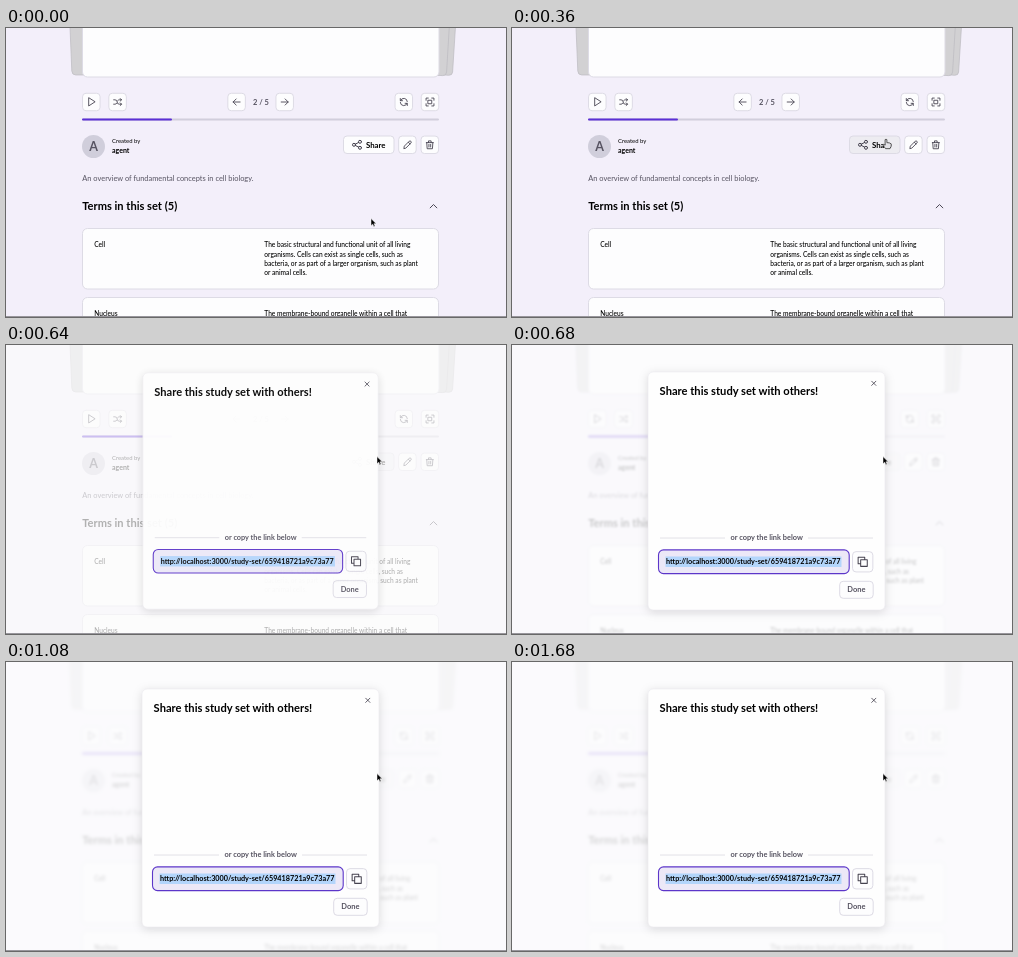
Animation, 500 px wide and 289 px high, one loop 1720 ms. Source, as an HTML page:

```html
<!DOCTYPE html>
<html lang="en">
<head>
<meta charset="utf-8">
<title>Share study set</title>
<style>
html, body { margin: 0; width: 100%; height: 100%; overflow: hidden; background: #f3effa; }
svg { display: block; width: 100vw; height: 100vh; font-family: Lato, sans-serif; }
.box { fill: #fdfdfe; stroke: #dddbe5; }
.icon { fill: none; stroke: #45424f; stroke-width: 2; stroke-linecap: round; stroke-linejoin: round; }
.rule { stroke: #e2e1e7; }
.stack { fill: #d2d1d3; stroke: #bcbbc0; stroke-width: .7; }
.bold { font-weight: 700; }
.body { font-size: 6.62px; font-weight: 500; }
.soft { fill: #565361; }
#dialog { transform-origin: 254.5px 150px; }
#panel { filter: drop-shadow(0 2px 5px #0002); }
</style>
</head>
<body>
<svg id="stage" viewBox="0 0 500 289" preserveAspectRatio="none"></svg>
<script>
const icons = {
  play: 'M6 3v18l14-9z',
  shuffle: 'M18 4l3 3-3 3M18 20l3-3-3-3M3 7h3a5 5 0 0 1 5 5 5 5 0 0 0 5 5h5M21 7h-5a5 5 0 0 0-4 2M3 17h3a5 5 0 0 0 4-2',
  prev: 'M20 12H4M11 5l-7 7 7 7',
  next: 'M4 12h16M13 5l7 7-7 7',
  refresh: 'M20 11A8 8 0 0 0 4.5 9M4 4v5h5M4 13a8 8 0 0 0 15.5 2M20 20v-5h-5',
  expand: 'M3 8V3h5M16 3h5v5M21 16v5h-5M8 21H3v-5M8 8h8v8H8z',
  share: 'M9 12a3 3 0 1 1-6 0 3 3 0 0 1 6 0M21 6a3 3 0 1 1-6 0 3 3 0 0 1 6 0M21 18a3 3 0 1 1-6 0 3 3 0 0 1 6 0M8.7 10.7l6.6-3.4M8.7 13.3l6.6 3.4',
  edit: 'M4 20l1-5L16 4a2.8 2.8 0 0 1 4 4L9 19zM14 6l4 4',
  trash: 'M4 7h16M10 11v6M14 11v6M5 7l1 14h12l1-14M9 7V3h6v4',
  copy: 'M8 8h13v13H8zM16 8V3H3v13h5',
  up: 'M5 15.500l7-7 7 7',
  close: 'M7 7l10 10M17 7L7 17'
};

const icon = (name, cx, cy, size = 10.5) =>
  `<path class="icon" d="${icons[name]}" transform="translate(${cx - size / 2} ${cy - size / 2}) scale(${size / 24})"/>`;
const box = (x, y, w, h, r = 3.5, extra = '') =>
  `<rect class="box" x="${x}" y="${y}" width="${w}" height="${h}" rx="${r}" ${extra}/>`;
const button = (name, cx, cy, size = 17.5) =>
  box(cx - size / 2, cy - size / 2, size, size) + icon(name, cx, cy, size * .6);
const text = (str, x, y, size, cls = '', extra = '') =>
  `<text x="${x}" y="${y}" class="${cls}" ${size ? `font-size="${size}"` : ''} ${extra}>${str}</text>`;
const middle = 'text-anchor="middle"';

const definition = [
  'The basic structural and functional unit of all living',
  'organisms. Cells can exist as single cells, such as',
  'bacteria, or as part of a larger organism, such as plant',
  'or animal cells.'
];

const page = `
  <path class="stack" d="M451.3-30L446.6 44q-.3 3.5-4 3.3L400 44V-30z"/>
  <path class="stack" d="M445-30L440.6 44q-.3 3.8-4 3.6L400 46V-30z"/>
  <path class="stack" d="M62.8-30L65.8 43q.2 4 4 4L100 47V-30z"/>
  ${box(76.5, -30, 356.5, 79, 5)}
  ${button('play', 85.3, 74)}${button('shuffle', 111.6, 74)}
  ${button('prev', 230.6, 74)}${button('next', 278.7, 74)}
  ${button('refresh', 397.8, 74)}${button('expand', 424, 74)}
  ${text('2 / 5', 255, 76.7, 7.5, 'bold soft', middle)}
  <rect x="76" y="90.5" width="357" height="2" rx="1" fill="#d1cedc"/>
  <rect x="76" y="90.5" width="90" height="2" rx="1" fill="#5b2fd6"/>
  <circle cx="87.5" cy="118.5" r="11.5" fill="#d0cedb"/>
  ${text('A', 87.5, 123, 12.5, 'bold soft', middle)}
  ${text('Created by', 106, 115.2, 5.9)}
  ${text('agent', 106, 125.4, 7, 'bold')}
  ${box(337.5, 108, 50.5, 17.5, 3.5, 'id="share"')}
  ${icon('share', 351, 116.8, 12)}
  ${text('Share', 360, 119.6, 7.8, 'bold')}
  ${button('edit', 401.4, 116.8)}${button('trash', 423.8, 116.8)}
  ${text('An overview of fundamental concepts in cell biology.', 76.3, 153, 7.45, 'soft')}
  ${text('Terms in this set (5)', 76.3, 182, 11.1, 'bold')}
  <g stroke-width="3">${icon('up', 427.5, 178.2, 11.5)}</g>
  ${box(76.5, 200.5, 356, 60.5, 5)}
  ${text('Cell', 88.2, 219.4, 0, 'body')}
  ${definition.map((line, i) => text(line, 258.3, 219.4 + i * 9.33, 0, 'body')).join('')}
  ${box(76.5, 269.5, 356, 60, 5)}
  ${text('Nucleus', 88.2, 288.3, 0, 'body')}
  ${text('The membrane-bound organelle within a cell that', 258.3, 288.3, 0, 'body')}`;

const dialog = `
  <rect id="panel" x="136" y="27" width="237" height="238" rx="5" fill="#fefefe" stroke="#ebeaef" stroke-width=".6"/>
  ${text('Share this study set with others!', 147.6, 50, 11.15, 'bold')}
  ${icon('close', 361.8, 38.3, 10)}
  <path class="rule" d="M148 193H213M296 193H361"/>
  ${text('or copy the link below', 254.7, 195.4, 7.4, 'bold soft', middle)}
  <rect x="146.5" y="204.9" width="190.7" height="23.7" rx="5" fill="#ece8f7" stroke="#5c36c9" stroke-width="1.1"/>
  <rect x="153.5" y="211.5" width="176" height="10.5" fill="#b3d5fb"/>
  ${text('http://localhost:3000/study-set/659418721a9c73a77', 154, 219.4, 7.26, 'bold', 'clip-path="url(#field)"')}
  ${button('copy', 350.7, 216.8, 20.3)}
  ${box(327.7, 236.3, 33.5, 17)}
  ${text('Done', 344.4, 247.4, 7.5, 'bold soft', middle)}`;

const stage = document.getElementById('stage');
stage.innerHTML = `
  <clipPath id="field"><path d="M150 207h179.5v20H150z"/></clipPath>
  <rect width="500" height="289" fill="#f3effa"/>
  <g id="page">${page}</g>
  <rect id="veil" width="500" height="289" fill="#fcfcfd"/>
  <g id="dialog">${dialog}</g>
  <path d="M0 288.5H500" stroke="#98969c"/>
  <path id="arrow" d="M0 0V7.2L1.700 5.700 2.900 8.200 4.100 7.600 2.900 5.200H5.200z" fill="#000" stroke="#fff" stroke-width=".5"/>
  <path id="hand" d="M-.9 0q.9-1 1.8 0V3q2.7-.2 4.3 1.2V6.5L4 9H-.4L-3.200 5.300q.4-1.300 2.300.2z" fill="#e4e3e8" stroke="#333" stroke-width=".8"/>`;

const el = Object.fromEntries(['page', 'share', 'veil', 'dialog', 'arrow', 'hand']
  .map(id => [id, document.getElementById(id)]));

const LOOP = 1720, STEP = 40, OPEN = 640;
const clamp = v => Math.min(1, Math.max(0, v));
const progress = (t, from, to) => clamp((t - from) / (to - from));
const ease = p => p * p * (3 - 2 * p);
const mix = (a, b, p) => a + (b - a) * p;

function draw(t) {
  const rise = ease(progress(t, 0, 160));
  const drift = ease(progress(t, 160, 480));
  const x = mix(mix(365, 380.5, rise), 371, drift);
  const y = mix(mix(190.5, 111.8, rise), 111.6, drift);
  const hover = y < 125.5;
  const showHand = hover && t < 560;
  for (const cursor of [el.arrow, el.hand]) cursor.setAttribute('transform', `translate(${x} ${y})`);
  el.hand.style.display = showHand ? '' : 'none';
  el.arrow.style.display = showHand ? 'none' : '';
  el.share.style.fill = hover ? '#edecf1' : '';

  const open = t >= OPEN;
  const pop = progress(t, OPEN, OPEN + STEP);
  const settle = progress(t, OPEN + STEP, OPEN + 200);
  el.veil.style.opacity = open ? mix(mix(.7, .8, pop), .85, settle) : 0;
  el.page.style.filter = pop ? `blur(${mix(1.2, 1.5, settle)}px)` : 'none';
  el.dialog.style.opacity = open ? mix(.94, 1, pop) : 0;
  el.dialog.style.transform = `scale(${mix(.993, 1, pop)})`;
}

const start = performance.now();
function tick() {
  const t = (performance.now() - start) % LOOP;
  draw(Math.floor(t / STEP) * STEP);
  requestAnimationFrame(tick);
}
tick();
</script>
</body>
</html>
```
